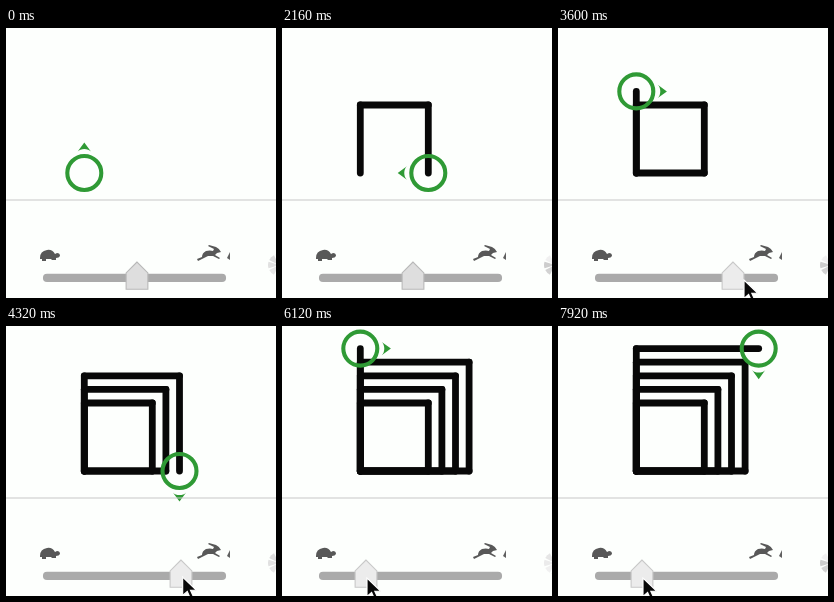
Animation, 270 px wide and 270 px high, one loop 8000 ms. Source, as an HTML page with a canvas:

```html
<!DOCTYPE html>
<html lang="en">
<head>
<meta charset="utf-8">
<title>Turtle squares</title>
<style>
  html, body { margin: 0; width: 100%; height: 100%; overflow: hidden; background: #fdfffd; }
  canvas { display: block; width: 270px; height: 270px; }
</style>
</head>
<body>
<canvas id="stage" width="270" height="270"></canvas>
<script>
const c = document.getElementById('stage').getContext('2d');
const LOOP = 8000, TICK = 180, SCALE = 1.36;

// Keyframe lists: [time, value]
const STEPS = [[405, 0], [2160, 6.5], [3600, 10.5], [5040, 32.4], [6120, 34.1], [7920, 36.8]];
const KNOB = [[2880, 131], [3420, 175], [4680, 175], [5040, 155], [5580, 84]];
const MOUSE_X = [[2520, 160], [2880, 142], [3420, 186], [3600, 186], [4680, 172], [5040, 152], [5580, 85]];
const MOUSE_Y = [[2520, 280], [2880, 252], [3600, 252], [5040, 250], [5580, 252]];

function at(keys, t) {
  if (t <= keys[0][0]) return keys[0][1];
  for (let i = 1; i < keys.length; i++) {
    const [t0, v0] = keys[i - 1], [t1, v1] = keys[i];
    if (t < t1) return v0 + (v1 - v0) * (t - t0) / (t1 - t0);
  }
  return keys[keys.length - 1][1];
}

function shape(d, x, y, scale, fill, stroke, width) {
  c.save();
  c.translate(x, y);
  c.scale(scale, scale);
  const path = new Path2D(d);
  c.lineJoin = 'miter';
  c.fillStyle = fill;
  c.fill(path);
  if (stroke) {
    c.strokeStyle = stroke;
    c.lineWidth = width;
    c.stroke(path);
  }
  c.restore();
}

function line(x0, y0, x1, y1, color, width, cap) {
  c.beginPath();
  c.moveTo(x0, y0);
  c.lineTo(x1, y1);
  c.strokeStyle = color;
  c.lineWidth = width;
  c.lineCap = cap;
  c.stroke();
}

// Odd steps draw a side, even steps turn right; sides grow after each square.
function drawSquares(steps) {
  let x = 78.3, y = 145, turns = 0;
  for (let i = 1; i <= steps; i++) {
    if (i % 2 === 0) { turns++; continue; }
    const side = SCALE * (50 + 10 * Math.floor((i - 1) / 8));
    const a = turns * Math.PI / 2;
    const nx = x + side * Math.sin(a), ny = y - side * Math.cos(a);
    line(x, y, nx, ny, '#080808', 5 * SCALE, 'round');
    x = nx;
    y = ny;
  }
  drawTurtle(x, y, turns * Math.PI / 2);
}

function drawTurtle(x, y, heading) {
  c.save();
  c.translate(x, y);
  c.scale(SCALE, SCALE);
  c.rotate(heading);
  c.strokeStyle = c.fillStyle = '#2f9a35';
  c.lineWidth = 3;
  c.beginPath();
  c.arc(0, 0, 12.5, 0, 2 * Math.PI);
  c.stroke();
  const polar = (r, a) => [r * Math.sin(a), -r * Math.cos(a)];
  c.beginPath();
  c.moveTo(0, -22.5);
  c.lineTo(...polar(16.5, -0.3));
  c.bezierCurveTo(...polar(18.5, -0.15), ...polar(18.5, 0.15), ...polar(16.5, 0.3));
  c.fill();
  c.restore();
}

function drawIcons() {
  // Tortoise, hare, and the edge of a clipped icon
  shape('M1 9 Q1 2 8 1 Q13 0 16 5 L18 4 Q21 4 21 7 Q20 9 17 9 L17 11 L13 11 L12 10 L7 10 L7 12 L3 12 L3 10 L1 10Z',
    33, 221, 1, '#585858');
  shape('M0 14 L5 12 Q5 8 9 6 Q13 5 16 6 L17 4 L11 1 L12 0 L19 2 Q23 4 24 7 L20 8 L18 10 L23 13 L22 14 L16 11 L11 11 L7 13 L1 16Z',
    191, 217, 1, '#585858');
  shape('M3 0 V8 L0 6Z', 221, 224, 1, '#606060');
}

function drawSpinner(t) {
  c.save();
  c.translate(273, 237);
  c.rotate(t / TICK * Math.PI / 4);
  for (let i = 0; i < 8; i++) {
    c.rotate(Math.PI / 4);
    c.beginPath();
    c.moveTo(0, 0);
    c.arc(0, 0, 11, -0.31, 0.31);
    const g = 240 - 5 * i;
    c.fillStyle = `rgb(${g},${g},${g})`;
    c.fill();
  }
  c.restore();
}

function draw(t) {
  c.fillStyle = '#fdfffd';
  c.fillRect(0, 0, 270, 270);
  drawSquares(Math.floor(at(STEPS, t)));
  line(0, 172, 270, 172, '#c8c8c8', 1.1, 'butt');
  drawIcons();
  drawSpinner(t);
  line(41, 249.9, 216, 249.9, '#aaa', 6 * SCALE, 'round');
  const held = t >= 2880;
  shape('M0 0 l-8 8 v12 h16 v-12Z', at(KNOB, t), 234, SCALE,
    held ? '#ececec' : '#dedede', held ? '#c8c8c8' : '#b8b8b8', 0.8);
  if (t >= 2520) {
    shape('M0 0 V16 L4 12.5 L6.6 18.5 L9.4 17.2 L6.8 11.5 H12Z',
      at(MOUSE_X, t), at(MOUSE_Y, t), 1.15, '#080808', '#fff', 1);
  }
}

const start = performance.now();
function frame() {
  const t = (performance.now() - start) % LOOP;
  draw(Math.floor(t / TICK) * TICK);
  requestAnimationFrame(frame);
}
frame();
</script>
</body>
</html>
```
